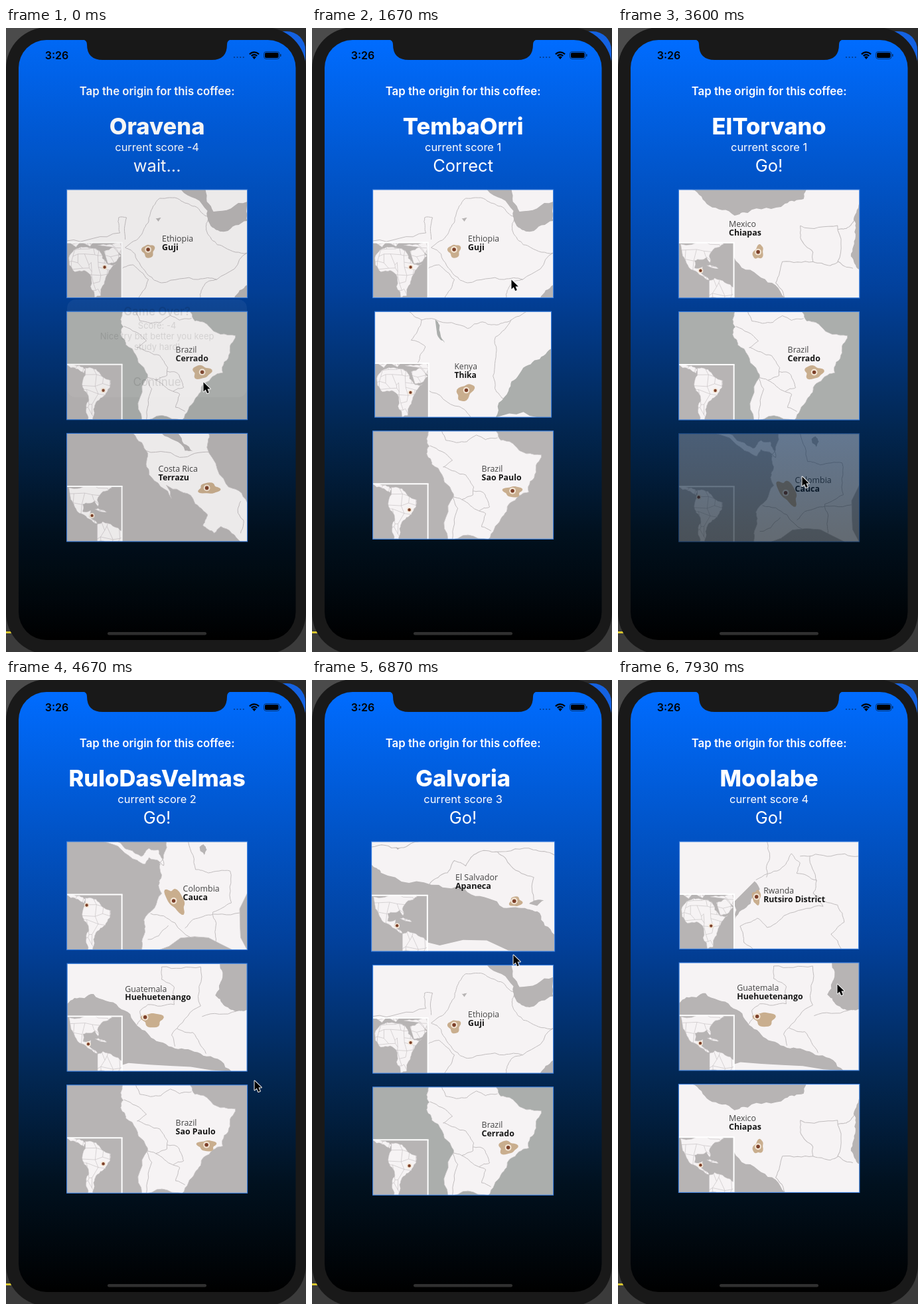
Recreate the animation shown at these times as an HTML page with a canvas. Size 452 by 938 pixels, loop 8 s.

```html
<!DOCTYPE html>
<html lang="en">
<head>
<meta charset="utf-8">
<title>Coffee origin quiz</title>
<style>
html, body { margin: 0; width: 100%; height: 100%; overflow: hidden; background: #191919; }
canvas { display: block; width: 452px; height: 938px; }
</style>
</head>
<body>
<canvas id="stage"></canvas>
<script>
const W = 452, H = 938, LOOP = 8000, CX = 227.6;
const MAP_W = 272, MAP_H = 162.5, INSET = 83;
const SEA = '#b7b4b4', COOL_SEA = '#abaeac', LAND = '#f6f3f4', BORDER = '#c1bdbe', BROWN = '#c9ae8e';
const UI = 'Inter, sans-serif', MAP_FONT = '"Open Sans", "Noto Sans", sans-serif';
const canvas = document.getElementById('stage');
const ratio = window.devicePixelRatio || 1;
canvas.width = W * ratio;
canvas.height = H * ratio;
const c = canvas.getContext('2d');

const clamp = v => Math.max(0, Math.min(1, v));
const smooth = v => v * v * (3 - 2 * v);

function random(seed) {
  return () => {
    seed = (seed * 1664525 + 1013904223) >>> 0;
    return seed / 4294967296;
  };
}

// Turns a few key points ("x,y x,y | x,y ...") into uneven, map-like lines.
function rough(keys, wobble, closed) {
  const path = new Path2D(), rnd = random(keys.length);
  const segment = (x0, y0, x1, y1, depth) => {
    if (!depth || Math.hypot(x1 - x0, y1 - y0) < 4) return path.lineTo(x1, y1);
    const k = (rnd() - 0.5) * wobble;
    const mx = (x0 + x1) / 2 - (y1 - y0) * k, my = (y0 + y1) / 2 + (x1 - x0) * k;
    segment(x0, y0, mx, my, depth - 1);
    segment(mx, my, x1, y1, depth - 1);
  };
  for (const run of keys.split('|')) {
    const pts = run.trim().split(' ').map(p => p.split(',').map(Number));
    path.moveTo(...pts[0]);
    pts.slice(1).forEach((p, i) => segment(...pts[i], ...p, 3));
    if (closed) path.closePath();
  }
  return path;
}
const shore = keys => rough(keys, 0.28, true);
const border = keys => rough(keys, 0.2, false);

// A jittered grid that reads as country borders.
function mesh(size, seed) {
  const rnd = random(seed), path = new Path2D(), n = Math.ceil(INSET / size) + 1;
  const nodes = Array.from({ length: n * n }, (_, i) =>
    [(i % n + rnd() * 0.8 - 0.4) * size, (Math.floor(i / n) + rnd() * 0.8 - 0.4) * size]);
  nodes.forEach((p, i) => {
    const links = [];
    if (i % n < n - 1 && rnd() < 0.8) links.push(nodes[i + 1]);
    if (i + n < n * n && rnd() < 0.8) links.push(nodes[i + n]);
    for (const q of links) { path.moveTo(...p); path.lineTo(...q); }
  });
  return path;
}

function blob(x, y, rx, ry, turn = 0) {
  const path = new Path2D();
  for (let a = 0; a < 6.28; a += 0.2) {
    const r = 0.9 + 0.14 * Math.sin(3 * a + x) + 0.08 * Math.sin(5 * a + y);
    const u = Math.cos(a) * rx * r, v = Math.sin(a) * ry * r;
    path.lineTo(x + u * Math.cos(turn) - v * Math.sin(turn), y + u * Math.sin(turn) + v * Math.cos(turn));
  }
  path.closePath();
  return path;
}

const insets = {
  africa: {
    land: shore('3,23 11,11 26,7 49,12 62,33 74,32 58,56 51,80 42,83 35,48 26,42 12,44 4,34' +
      '|56,13 70,7 82,20 72,30 62,32|4,0 20,0 14,7|24,0 40,0 35,6|46,4 82,0 82,18 70,7'),
    lines: mesh(10, 5)
  },
  south: {
    land: shore('28,5 44,7 66,24 60,42 48,54 42,62 39,83 32,83 33,55 32,46 23,30 28,16|0,0 8,0 28,8 26,13 6,5'),
    lines: mesh(14, 9)
  },
  central: {
    land: shore('3,2 68,2 46,20 47,30 42,22 24,27 24,38 36,36 34,46 46,56 40,54 16,38 6,20' +
      '|46,57 54,53 84,68 84,83 46,83|42,34 52,35 60,39 50,38'),
    lines: mesh(13, 3)
  }
};

const brazil = {
  name: 'Brazil', label: [164, 61.5], inset: 'south', pin: [55, 39],
  land: shore('84,0 81,12 85,23 81,34 89,50 116,84 122,98 113,163 174,163 193,132 207,108 235,92 246,62 254,36 213,21 193,14 186,0'),
  lines: border('104,0 110,14 142,16 156,6 170,13 188,10|86,22 120,44 106,54 108,54 140,66 152,84 151,96 134,103 121,99' +
    '|151,90 168,94 176,114 160,120 134,103|121,99 128,116 120,163|160,120 170,124 164,144 178,150')
};
const maps = {
  guji: {
    name: 'Ethiopia', region: 'Guji', label: [143.5, 78], dot: [122.5, 90], inset: 'africa', pin: [57, 37],
    blob: blob(123, 92, 10, 11),
    sea: shore('172,0 212,32 214,49 222,58 238,63 272,47 272,18 221,33 209,0|252,163 272,143 272,163|134,43 142,42 138,48'),
    lines: border('123,49 130,25 140,13 170,15 193,25 214,42 210,60 218,75 238,87 272,95|123,49 113,67 88,87 103,97 123,129 143,140 198,135 226,135 272,95' +
      '|226,135 208,142 201,163|0,77 80,65 78,42 90,42 88,75|83,119 100,113 123,135 108,163')
  },
  cerrado: { ...brazil, region: 'Cerrado', dot: [204, 91], tone: COOL_SEA, blob: blob(203, 91, 15, 11) },
  paulo: { ...brazil, region: 'Sao Paulo', dot: [210.5, 90], blob: blob(211, 91, 15, 9) },
  terrazu: {
    name: 'Costa Rica', region: 'Terrazu', label: [138, 58], dot: [211, 82], inset: 'central', pin: [38, 44],
    blob: blob(214, 83, 17, 9),
    land: shore('100,0 122,30 124,62 158,98 150,78 190,98 212,122 205,138 222,150 232,140 262,163 272,163 272,104 240,76 213,12 214,0'),
    sea: shore('143,0 178,26 190,27 168,0'),
    lines: border('112,24 170,36 216,28|262,102 258,120 266,130 262,150')
  },
  thika: {
    name: 'Kenya', region: 'Thika', width: 266, label: [122.5, 89], dot: [141, 121], inset: 'africa', pin: [55, 45],
    tone: COOL_SEA, blob: blob(139, 124, 17, 11, -0.8),
    sea: shore('272,57 246,75 222,97 206,122 186,163 272,163|93,12 100,21 108,48 96,35'),
    lines: border('93,12 143,26 166,16 184,20 210,13 234,0|210,13 186,39|186,39 185,80|185,80 185,118|185,118 201,136|82,121 130,146 148,163|52,0 72,13 56,44 78,54 66,79|72,13 93,12')
  },
  chiapas: {
    name: 'Mexico', region: 'Chiapas', width: 272.5, label: [75.5, 55.5], dot: [119.5, 93.5], inset: 'central', pin: [33, 42],
    blob: blob(120, 94, 8, 12, 0.4),
    sea: shore('20,0 46,24 84,39 104,35 160,21 188,14 192,0|83,101 124,132 160,163 83,163|272,16 263,45 266,70 259,100 272,120'),
    lines: border('239,54 183,54|183,54 183,72|183,72 202,94 202,108|202,108 156,108|156,108 146,140 160,163|239,54 239,108|239,60 256,56 266,42|202,108 228,114 240,108 262,118')
  },
  cauca: {
    name: 'Colombia', region: 'Cauca', label: [175, 74.5], dot: [161, 89], inset: 'south', pin: [30, 16],
    blob: blob(164, 88, 23, 12, 0.95),
    land: shore('150,0 140,32 143,50 138,66 143,78 116,118 117,138 113,163 272,163 272,0' +
      '|56,0 106,28 118,34 124,24 146,36 138,12 124,10 112,22 76,0'),
    sea: shore('200,8 206,4 211,12 207,20 201,14'),
    lines: border('183,0 194,42 213,47 246,44 248,92 220,106 224,140 221,163|126,108 163,122 213,163|122,147 138,142 153,126|178,130 190,117 221,109 272,102')
  },
  huehue: {
    name: 'Guatemala', region: 'Huehuetenango', width: 271, label: [87.5, 42.5], dot: [118, 81], inset: 'central', pin: [32, 42],
    blob: blob(129, 85, 17, 12),
    sea: shore('0,61 11,52 40,46 78,66 106,94 135,117 173,128 211,140 249,163 0,163|231,0 232,28 224,48 236,62 256,72 272,70 272,0'),
    lines: border('104,94 112,84 110,72 122,62|122,62 162,62|162,62 162,36 143,24 143,5|143,5 202,5|202,5 202,64|202,64 166,98 158,108 163,125|166,98 190,104 210,136|204,80 256,72')
  },
  apaneca: {
    name: 'El Salvador', region: 'Apaneca', width: 276, label: [124.5, 57], dot: [212, 88], inset: 'central', pin: [38, 45],
    blob: blob(214, 89, 10, 8),
    sea: shore('0,34 14,46 100,64 148,78 196,98 232,100 250,106 272,138 272,163 0,163|36,8 43,9 39,12|234,92 256,87 246,95'),
    lines: border('86,63 113,46 123,28 140,36 155,18 187,15 207,36 241,53 241,88|0,8 40,10 70,0|187,15 240,12 272,20')
  },
  rutsiro: {
    name: 'Rwanda', region: 'Rutsiro District', width: 270, label: [127.5, 79], dot: [117, 83.5], inset: 'africa', pin: [48, 48],
    blob: blob(117, 84, 7, 12),
    sea: shore('114,60 122,72 108,94 84,117 84,90'),
    lines: border('116,58 153,42 170,18 183,32 178,48 208,58 203,78 218,98 168,108 133,130 118,116 92,128 98,153 112,163|133,0 137,20 132,54' +
      '|183,22 230,22|230,22 272,22|198,22 208,60|203,78 240,96 250,122 230,140 246,163')
  }
};

const rounds = [
  { at: 0, title: 'Oravena', rows: 'guji cerrado terrazu' },
  { at: 330, title: 'TembaOrri', rows: 'guji thika paulo' },
  { at: 2000, title: 'ElTorvano', rows: 'chiapas cerrado cauca' },
  { at: 4400, title: 'RuloDasVelmas', rows: 'cauca huehue paulo' },
  { at: 6000, title: 'Galvoria', rows: 'apaneca guji cerrado' },
  { at: 7860, title: 'Moolabe', rows: 'rutsiro huehue chiapas' }
];
const taps = [
  { down: 1080, up: 1230, row: 0 },
  { down: 3480, up: 3670, row: 2 },
  { down: 5080, up: 5220, row: 2 },
  { down: 7200, up: 7300, row: 0 }
];
const moves = [
  { from: 250, to: 1000, x: 300, y: 378 },
  { from: 2000, to: 2730, x: 277, y: 527 },
  { from: 2870, to: 3400, x: 277, y: 674 },
  { from: 3750, to: 4400, x: 374, y: 602 },
  { from: 4670, to: 5050, x: 278, y: 693 },
  { from: 5530, to: 6070, x: 427, y: 648 },
  { from: 6270, to: 6870, x: 303, y: 413 },
  { from: 6870, to: 7070, x: 257, y: 349 },
  { from: 7350, to: 7930, x: 330, y: 457 }
];

const sky = c.createLinearGradient(0, 18, 0, 920);
[[0, '#006cff'], [0.42, '#02409a'], [0.65, '#022650'], [0.82, '#01111f'], [1, '#000']]
  .forEach(([at, color]) => sky.addColorStop(at, color));

function text(str, x, y, font, fill = '#fff', align = 'center') {
  c.font = font;
  c.fillStyle = fill;
  c.textAlign = align;
  c.fillText(str, x, y);
}

function box(x, y, w, h, r, fill) {
  c.fillStyle = fill;
  c.beginPath();
  c.roundRect(x, y, w, h, r);
  c.fill();
}

function disc(x, y, r, fill) {
  c.fillStyle = fill;
  c.beginPath();
  c.arc(x, y, r, 0, Math.PI * 2);
  c.fill();
}

function pin(x, y, r) {
  disc(x, y, r * 1.75, '#f3e6d6');
  disc(x, y, r, '#7d4029');
}

// Land on water, or water on land, with borders kept to the land.
function terrain(m, w, h, lineWidth) {
  const water = m.tone || SEA;
  c.save();
  c.beginPath();
  c.rect(0, 0, w, h);
  c.clip();
  c.fillStyle = m.land ? water : LAND;
  c.fillRect(0, 0, w, h);
  c.save();
  if (m.land) {
    c.fillStyle = LAND;
    c.fill(m.land);
    c.clip(m.land);
  }
  c.strokeStyle = BORDER;
  c.lineWidth = lineWidth;
  c.stroke(m.lines);
  if (m.land) c.stroke(m.land);
  c.restore();
  if (m.sea) {
    c.fillStyle = water;
    c.fill(m.sea);
  }
  c.restore();
}

function drawMap(m, x, y, w, alpha) {
  c.save();
  c.translate(x, y);
  c.scale(w / MAP_W, w / MAP_W);
  terrain(m, MAP_W, MAP_H, 1);
  c.fillStyle = BROWN;
  c.fill(m.blob);
  pin(...m.dot, 2.8);
  const [lx, ly] = m.label;
  text(m.name, lx, ly, '12.4px ' + MAP_FONT, '#444', 'left');
  text(m.region, lx, ly + 13, 'bold 12.4px ' + MAP_FONT, '#161616', 'left');

  c.save();
  c.translate(0, MAP_H - INSET);
  terrain(insets[m.inset], INSET, INSET, 0.6);
  pin(...m.pin, 2.2);
  box(0, -1, INSET + 1, 2, 0, '#fff');
  box(INSET - 1, 0, 2, INSET, 0, '#fff');
  c.restore();
  c.strokeStyle = '#3b80e0';
  c.lineWidth = 1.1;
  c.strokeRect(0, 0, MAP_W, MAP_H);
  c.restore();

  // A pressed map lets the backdrop through.
  c.globalAlpha = 1 - alpha;
  box(x - 1, y - 1, w + 2, w * MAP_H / MAP_W + 2, 0, sky);
  c.globalAlpha = 1;
}

function drawPhone() {
  c.fillStyle = '#4b4b4b';
  c.fillRect(0, 0, W, H);
  box(226, 0, 226, 120, 0, '#2b2b2b');
  box(226, 5, 225, 120, 28, '#1462e2');
  box(0, 840, W, 98, 0, '#3b3b3b');
  box(0, 907, 8, 3, 0, '#d9c62e');
  box(0, -1, W, 942, 62, '#191919');
  box(19, 18, 417.5, 902, 42, sky);

  c.fillStyle = '#191919';
  c.fill(new Path2D('M115 17Q122 18 122 25Q122 48 146 48H310Q333 48 333 25Q333 18 340 17Z'));
  text('3:26', 76.5, 46.5, '600 16px ' + UI, '#000');
  for (let i = 0; i < 4; i++) disc(344 + i * 4.6, 44, 1.1, '#063a86');
  c.strokeStyle = '#000';
  c.lineWidth = 2.3;
  for (const r of [5.8, 9.6]) {
    c.beginPath();
    c.arc(374, 46, r, -Math.PI * 0.76, -Math.PI * 0.24);
    c.stroke();
  }
  c.fillStyle = '#000';
  c.fill(new Path2D('M374 47L371 43.6Q374 41.4 377 43.6Z'));
  c.lineWidth = 1;
  c.strokeStyle = '#06336f';
  c.beginPath();
  c.roundRect(388.5, 35.5, 23.5, 11, 3.5);
  c.stroke();
  box(390, 37, 20.5, 8, 2, '#000');
  box(413, 39, 1.6, 4, 1, '#06336f');
  box(153, 908, 149, 4.5, 2.2, '#303030');
}

function drawAlert(t) {
  const a = 1 - clamp(t / 200);
  if (!a) return;
  box(19, 18, 417.5, 902, 42, `rgba(0,0,0,${0.04 * a})`);
  box(92, 408, 271, 147, 13, `rgba(240,240,240,${0.05 * a})`);
  c.globalAlpha = 0.11 * a;
  text('Game Over?', CX, 432, '600 17px ' + UI, '#000');
  ['Score: -4', 'Nice try but better you keep', 'study hard!']
    .forEach((line, i) => text(line, CX, 452 + i * 16, '13px ' + UI, '#000'));
  text('Continue', CX, 538, '17px ' + UI, '#000');
  c.globalAlpha = 1;
}

function drawPointer(t) {
  let x = 297, y = 532;
  for (const m of moves) {
    const k = smooth(clamp((t - m.from) / (m.to - m.from)));
    x += (m.x - x) * k;
    y += (m.y - y) * k;
  }
  c.save();
  c.translate(x, y);
  const arrow = new Path2D('M0.5 0.5V14.5L3.8 11.5 6.2 17 8.8 16 6.5 10.5H10.8Z');
  c.lineJoin = 'round';
  c.lineWidth = 2;
  c.strokeStyle = '#f4f4f4';
  c.stroke(arrow);
  c.fillStyle = '#000';
  c.fill(arrow);
  c.restore();
}

function tapAlpha(tap, t) {
  if (t < tap.up) return 1 - 0.6 * clamp((t - tap.down) / 60);
  return 0.4 + 0.6 * clamp((t - tap.up) / 125);
}

function draw(t) {
  c.setTransform(ratio, 0, 0, ratio, 0, 0);
  drawPhone();
  const index = rounds.findLastIndex(r => t >= r.at);
  const round = rounds[index], end = rounds[index + 1]?.at ?? LOOP;
  const tap = taps.find(p => p.down >= round.at && p.down < end);
  const score = index ? taps.filter(p => t >= p.up).length : -4;
  const status = !index ? 'wait...' : tap && t >= tap.up ? 'Correct' : 'Go!';

  text('Tap the origin for this coffee:', CX, 101, '600 16.8px ' + UI);
  text(round.title, CX, 160, '800 34.5px ' + UI);
  text('current score ' + score, CX, 185, '16.4px ' + UI);
  text(status, CX, 215.5, '25.5px ' + UI);

  let y = 243;
  round.rows.split(' ').forEach((id, row) => {
    const w = maps[id].width || MAP_W;
    drawMap(maps[id], CX - w / 2, y, w, tap?.row === row ? tapAlpha(tap, t) : 1);
    y += w * 0.6 + 20;
  });
  drawAlert(t);
  drawPointer(t);
}

const start = performance.now();
function frame() {
  draw((performance.now() - start) % LOOP);
  requestAnimationFrame(frame);
}
frame();
</script>
</body>
</html>
```
